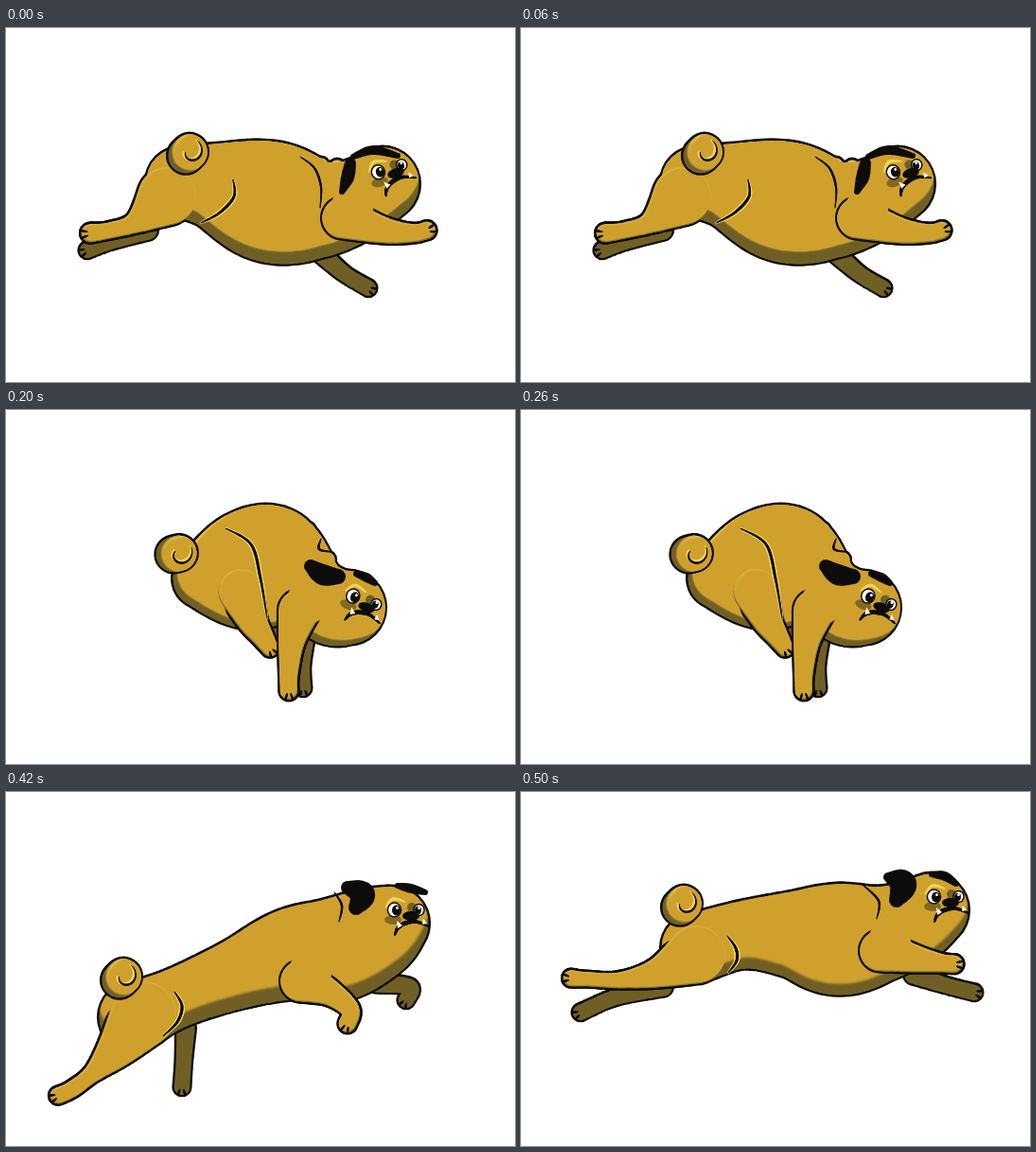
An HTML page with a canvas for the animation above (600 ms loop, 538 by 374 pixels).

```html
<!DOCTYPE html>
<html lang="en">
<head>
<meta charset="utf-8">
<title>Running pug</title>
<style>
html, body { margin: 0; width: 100%; height: 100%; overflow: hidden; background: #fff; }
canvas { display: block; width: 538px; height: 374px; }
</style>
</head>
<body>
<canvas id="stage"></canvas>
<script>
const W = 538, H = 374, TAU = Math.PI * 2;
const FUR = '#d0a02d', DARK = '#705f25', LIGHT = '#f0d458', INK = '#0d0c0a';
const HEAD_R = 40, FRONT_R = [23, 15, 11, 10.5], FAR_R = [11, 9.5, 9.5], EAR_R = [3, 5, 3];

const canvas = document.getElementById('stage');
const ctx = canvas.getContext('2d');
const dpr = window.devicePixelRatio || 1;
canvas.width = W * dpr;
canvas.height = H * dpr;

const parse = text => text.split(' ').map(s => s.split(',').map(Number));
const withR = (text, radii) => parse(text).map((p, i) => [...p, radii[i]]);

// Catmull-Rom through points of any dimension.
function spline(p, steps = 14) {
  const out = [], last = p.length - 1;
  const at = i => p[Math.max(0, Math.min(last, i))];
  for (let i = 0; i < last; i++) {
    const a = at(i - 1), b = at(i), c = at(i + 1), d = at(i + 2);
    for (let k = 0; k < steps; k++) {
      const t = k / steps;
      out.push(b.map((v, j) => v + 0.5 * t * (c[j] - a[j]
        + t * (2 * a[j] - 5 * v + 4 * c[j] - d[j]
        + t * (3 * (v - c[j]) + d[j] - a[j])))));
    }
  }
  return [...out, p[last]];
}

// Flesh around a bone: the union of circles x, y, r along it.
function skin(circles, grow = 0, dx = 0, dy = 0) {
  const path = new Path2D();
  for (const [x, y, r] of circles) {
    path.moveTo(x + dx + r + grow, y + dy);
    path.arc(x + dx, y + dy, r + grow, 0, TAU);
  }
  return path;
}

function fill(path, color) {
  ctx.fillStyle = color;
  ctx.fill(path);
}

const outline = c => fill(skin(c, 1.1, 0, -0.3), INK);

// Dark rim on the side away from (sx, sy), light rim along the top.
function flesh(circles, sx, sy, light) {
  const shape = skin(circles, -1.2);
  ctx.save();
  ctx.clip(shape);
  fill(shape, DARK);
  ctx.filter = 'blur(0.8px)';
  fill(skin(circles, -1.2, sx, sy), light ? LIGHT : FUR);
  if (light) {
    ctx.clip(skin(circles, -1.2, sx, sy));
    fill(skin(circles, -1.2, sx, sy + light), FUR);
  }
  ctx.restore();
}

// Brush line, thin at both ends.
function brush(points, color, w) {
  const n = points.length - 1;
  ctx.strokeStyle = color;
  for (let i = 0; i < n; i++) {
    ctx.lineWidth = w * (0.35 + 0.65 * Math.sin(Math.PI * (i + 0.5) / n));
    ctx.beginPath();
    ctx.moveTo(...points[i]);
    ctx.lineTo(...points[i + 1]);
    ctx.stroke();
  }
}

const ink = (text, w = 2.8) => brush(spline(parse(text)), INK, w);
const glow = (text, w = 3) => brush(spline(parse(text)), LIGHT, w);

function oval(x, y, rx, ry, color) {
  const path = new Path2D();
  path.ellipse(x, y, rx, ry, 0, 0, TAU);
  fill(path, color);
}

function poly(text, color) {
  const path = new Path2D();
  parse(text).forEach(p => path.lineTo(...p));
  fill(path, color);
}

function placed([x, y, deg = 0], draw) {
  ctx.save();
  ctx.translate(x, y);
  ctx.rotate(deg * TAU / 360);
  draw();
  ctx.restore();
}

// Two claw lines pointing out of the last joint of a leg.
function toes(leg) {
  const [x, y, r] = leg[leg.length - 1], [px, py] = leg[leg.length - 6];
  const dir = Math.atan2(y - py, x - px) * 360 / TAU;
  placed([x, y, dir], () => {
    for (const side of [-1, 1]) ink(`${r * 0.25},${side * 2} ${r - 1},${side * 4}`, 2.2);
  });
}

function tail(at) {
  placed(at, () => {
    const ball = spline([[-2, 2, 20], [2, -2, 20]]);
    outline(ball);
    flesh(ball, 5, -4, 3);
    const curl = Array.from({ length: 30 }, (_, i) => {
      const a = -1 + i * 0.14, r = 14 - i * 0.3;
      return [3 + r * Math.cos(a), -2 + r * Math.sin(a)];
    });
    brush(curl.map(([x, y]) => [x - 2, y - 1]), LIGHT, 3);
    brush(curl, INK, 2.2);
  });
}

function eye(x, y, rx, ry, look) {
  oval(x, y, rx + 1.5, ry + 1.5, INK);
  oval(x, y, rx, ry, '#fff');
  oval(x + look, y + 0.5, rx * 0.72, ry * 0.8, INK);
  oval(x + look + 1, y - 2, 1.4, 1.5, '#fff');
}

function face(at) {
  placed(at, () => {
    oval(-20, 4, 9, 5, '#84681f');
    oval(0, -9, 5, 5, DARK);
    glow('-28,-9 -20,-18 -7,-15');
    eye(-18.5, -6.5, 6.3, 6.8, 2);
    eye(7.5, -6.5, 4.8, 5.2, -1);
    oval(-1, 0, 9, 5, INK);
    ink('0,2 -1,7', 4);
    ink('-18,20 -15,13 -8,8 4,6 18,11', 4.5);
    poly('-16,5 -10,10 -15,13', '#fff');
    poly('12,3 16,8 11,9', '#fff');
  });
}

// Skin rolls behind the neck, spaced evenly between two points.
function folds(text) {
  const [[x1, y1], [x2, y2]] = parse(text);
  return [0, 0.5, 1].map(t => [x1 + (x2 - x1) * t, y1 + (y2 - y1) * t, 9]);
}

function dog(pose) {
  const [hx, hy] = pose.head;
  const torso = spline([...parse(pose.torso), [hx, hy, HEAD_R]]);
  const hind = spline(parse(pose.hind));
  const front = spline(withR(pose.front, FRONT_R));
  const rolls = pose.folds ? folds(pose.folds) : [];
  const [sx, sy] = pose.shade;

  for (const text of pose.far) {
    const leg = spline(withR(text, FAR_R));
    outline(leg);
    fill(skin(leg, -1.2), DARK);
    toes(leg);
  }
  [hind, front, rolls, torso].forEach(outline);
  flesh(rolls, 0, 0, 3);
  flesh(torso, sx, sy, pose.light);

  outline(hind.slice(7));
  flesh(hind, 1, -2, 2);
  toes(hind);
  outline(front);
  flesh(front, -1, -2, 2);
  toes(front);
  // Melt the top of the shoulder into the chest.
  const [fx, fy, fr] = front[0];
  oval(fx + fr * 0.4, fy - fr * 0.4, fr, fr, FUR);

  glow(pose.thigh, 6);
  ink(pose.thigh, 3);
  ink(pose.neck, 2.4);
  tail(pose.tail);
  fill(skin(spline(parse(pose.ear))), INK);
  fill(skin(spline(withR(pose.farEar, EAR_R))), INK);
  face(pose.face);
}

// Joints are x,y or x,y,radius, from the body outwards.
const stretch = {
  torso: '185,163,38 225,168,47 280,184,65 325,192,53 365,184,45', head: [398, 165],
  hind: '170,178,32 138,205,13 110,214,10 89,217,11',
  front: '356,201 400,214 430,217 445,214',
  far: ['150,214 110,226 86,235', '335,240 358,260 383,275'],
  shade: [0, -14], light: 3, folds: '316,143 350,147',
  thigh: '240,160 241,178 226,195 206,206', neck: '311,136 326,148 333,168 332,190',
  ear: '364,143,6 361,158,7 355,173,3', farEar: '367,136 388,129 414,135',
  tail: [192, 133], face: [413, 153, -17]
};
const gather = {
  torso: '220,153,33 262,158,56 300,175,66 345,190,52 380,210,46', head: [410, 217],
  hind: '250,174,36 225,212,26 195,211,14 162,195,10 154,189,10',
  front: '334,230 338,254 358,283 376,306',
  far: ['190,212 165,206 143,202', '290,245 288,275 290,301'],
  shade: [2, -9], light: 5, folds: '355,150 384,177',
  thigh: '288,158 294,172 282,195 262,213', neck: '364,154 362,167 340,184',
  ear: '351,187,5 368,188,11 384,186,8', farEar: '404,174 420,177 436,180',
  tail: [203, 123], face: [427, 206, -6]
};
const crouch = {
  torso: '208,178,33 262,168,65 288,158,52 322,188,38 343,207,42', head: [362, 209],
  hind: '248,192,25 260,222,17 270,238,13 279,252,10',
  front: '310,212 302,245 299,280 299,297',
  far: ['268,212 281,226 282,248', '316,240 313,270 314,294'],
  shade: [5, -7], light: 4, folds: '319,127 340,158',
  thigh: '232,125 259,142 269,178 276,220', neck: '333,136 331,147 345,150',
  ear: '322,165,7 335,174,11 351,176,8', farEar: '370,173 381,177 390,183',
  tail: [180, 152, 30], face: [382, 209, 20]
};
const leap = {
  torso: '135,238,38 180,218,33 243,193,38 300,172,49 345,168,56 385,152,51', head: [408, 139],
  hind: '145,235,36 118,270,22 92,297,11 70,314,10 55,321,10',
  front: '312,200 342,212 364,230 361,245',
  far: ['190,250 188,282 186,312', '392,202 427,206 423,220'],
  shade: [0, -16], light: 0,
  thigh: '178,211 186,226 181,243 166,258', neck: '347,106 355,120 352,137',
  ear: '361,101,7 377,108,13 370,122,8', farEar: '414,99 428,102 443,106',
  tail: [122, 197], face: [429, 131]
};
const glide = {
  torso: '185,165,38 235,151,37 290,151,47 335,156,60 375,151,52 410,140,46', head: [434, 125],
  hind: '185,172,32 145,191,17 105,199,10 70,198,9 53,197,10',
  front: '380,168 420,177 445,181 458,182',
  far: ['150,206 100,217 63,233', '415,193 448,204 479,212'],
  shade: [0, -12], light: 0,
  thigh: '218,152 227,165 228,178 219,191', neck: '360,97 378,115 376,134',
  ear: '388,90,5 404,97,14 397,114,8', farEar: '434,87 448,89 460,97',
  tail: [170, 120], face: [455, 117]
};

const cycle = [stretch, gather, crouch, leap, leap, glide];
const start = performance.now();
let shown = null;

function tick() {
  const step = Math.floor((performance.now() - start) / 100) % cycle.length;
  if (cycle[step] !== shown) {
    shown = cycle[step];
    ctx.setTransform(dpr, 0, 0, dpr, 0, 0);
    ctx.lineCap = ctx.lineJoin = 'round';
    ctx.fillStyle = '#fff';
    ctx.fillRect(0, 0, W, H);
    dog(shown);
  }
  requestAnimationFrame(tick);
}
tick();
</script>
</body>
</html>
```
